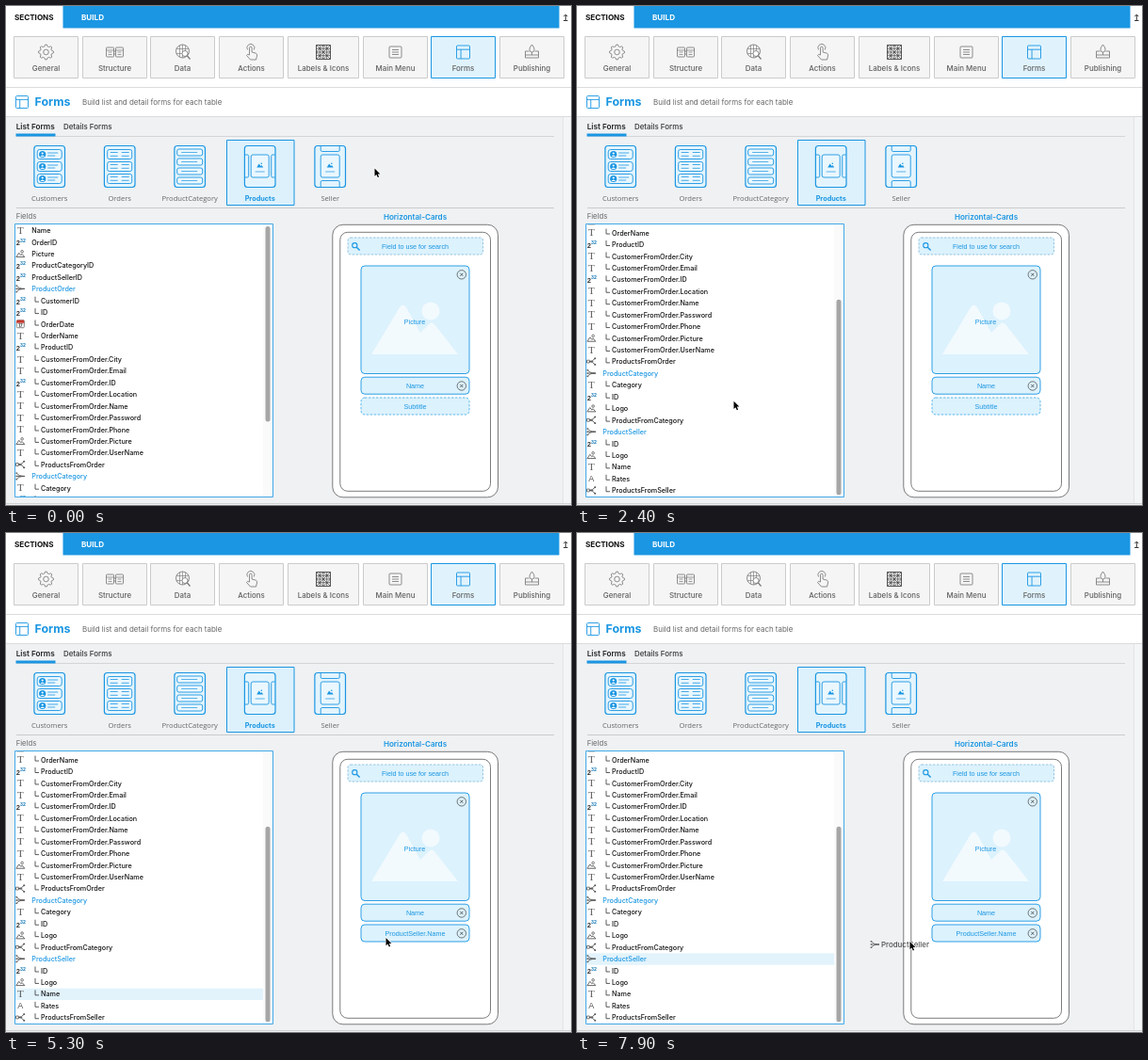
Write an HTML page with a canvas that moves like this. It is 600 px wide and 530 px high and loops after 8000 ms.

```html
<!DOCTYPE html>
<html lang="en">
<head>
<meta charset="utf-8">
<title>Forms editor</title>
<style>
html, body { margin: 0; width: 100%; height: 100%; overflow: hidden; background: #fff; }
canvas { display: block; width: 600px; height: 530px; }
</style>
</head>
<body>
<canvas id="stage"></canvas>
<script>
const W = 600, H = 530, LOOP = 8000, STEP = 100;
const BLUE = '#1a96e2', PALE = '#dcf2fd', GREY = '#737373', LINE = '#c9cbcd';
const SANS = 'Inter, "Open Sans", sans-serif';
const ARIAL = '"Liberation Sans", Arial, sans-serif';
const ROW = 12.44, LIST_TOP = 238.5;

const canvas = document.getElementById('stage');
const c = canvas.getContext('2d');
const dpr = window.devicePixelRatio || 1;
canvas.width = W * dpr;
canvas.height = H * dpr;

const rows = ('T Name,# OrderID,P Picture,# ProductCategoryID,# ProductSellerID,R ProductOrder,' +
  '# CustomerID,# ID,D OrderDate,T OrderName,# ProductID,' +
  'T CustomerFromOrder.City,T CustomerFromOrder.Email,# CustomerFromOrder.ID,' +
  'T CustomerFromOrder.Location,T CustomerFromOrder.Name,T CustomerFromOrder.Password,' +
  'T CustomerFromOrder.Phone,P CustomerFromOrder.Picture,T CustomerFromOrder.UserName,' +
  'M ProductsFromOrder,R ProductCategory,T Category,# ID,P Logo,M ProductFromCategory,' +
  'R ProductSeller,# ID,P Logo,T Name,A Rates,M ProductsFromSeller')
  .split(',').map(s => ({ type: s[0], name: s.slice(2) }));

// Keyframes: time, values...
const cursorKeys = [
  [300, 391.5, 172.5], [900, 169.5, 418], [2300, 169.5, 418], [3300, 62, 478],
  [3400, 62, 478], [3500, 54, 489], [3600, 55, 489], [4100, 403.5, 430],
  [5300, 403.5, 430], [6500, 78, 458], [6700, 78, 458], [6900, 57, 450],
  [7100, 57, 450], [7900, 353.5, 434]
];
const scrollKeys = [[900, 0], [1800, 49.8], [2000, 109.4]];

const ease = u => u * u * (3 - 2 * u);
const same = u => u;

function sample(keys, t, curve) {
  if (t <= keys[0][0]) return keys[0].slice(1);
  for (let i = 1; i < keys.length; i++) {
    const a = keys[i - 1], b = keys[i];
    if (t <= b[0]) {
      const u = curve((t - a[0]) / (b[0] - a[0]));
      return a.slice(1).map((v, k) => v + (b[k + 1] - v) * u);
    }
  }
  return keys[keys.length - 1].slice(1);
}

function text(s, x, y, size, color, o = {}) {
  c.font = `${o.weight || 400} ${size}px ${o.font || SANS}`;
  c.textAlign = o.align || 'left';
  c.fillStyle = color;
  c.fillText(s, x, y + size * 0.36);
}

function rect(x, y, w, h, color) {
  c.fillStyle = color;
  c.fillRect(x, y, w, h);
}

function box(x, y, w, h, r, fill, stroke, lw = 1, dash = []) {
  c.beginPath();
  c.roundRect(x, y, w, h, r);
  if (fill) { c.fillStyle = fill; c.fill(); }
  if (stroke) {
    c.strokeStyle = stroke;
    c.lineWidth = lw;
    c.setLineDash(dash);
    c.stroke();
    c.setLineDash([]);
  }
}

function dot(x, y, r, fill, stroke, lw = 1) {
  c.beginPath();
  c.arc(x, y, r, 0, 7);
  if (fill) { c.fillStyle = fill; c.fill(); }
  if (stroke) { c.strokeStyle = stroke; c.lineWidth = lw; c.stroke(); }
}

// SVG path drawn relative to (x, y)
function path(d, x, y, stroke, lw = 0.8, fill) {
  c.save();
  c.translate(x, y);
  const p = new Path2D(d);
  if (fill) { c.fillStyle = fill; c.fill(p); }
  if (stroke) { c.strokeStyle = stroke; c.lineWidth = lw; c.stroke(p); }
  c.restore();
}

function gear(x, y) {
  c.beginPath();
  for (let i = 0; i < 32; i++) {
    const a = (i - 0.5) * Math.PI / 16, r = i % 4 < 2 ? 8 : 6.2;
    c.lineTo(x + r * Math.cos(a), y + r * Math.sin(a));
  }
  c.closePath();
  c.strokeStyle = GREY;
  c.lineWidth = 0.8;
  c.stroke();
  dot(x, y, 2.8, null, GREY, 0.8);
}

function layoutIcon(x, y, s) {
  box(x - s, y - s, 2 * s, 2 * s, 1, null, BLUE, 0.9);
  path(`M${-s} ${-s * 0.4}H${s}M${-s * 0.35} ${-s * 0.4}V${s}`, x, y, BLUE, 0.9);
}

const toolIcons = [
  gear,
  (x, y) => {
    for (const k of [-9, 1]) {
      box(x + k, y - 5, 8, 10, 0.8, null, GREY, 0.8);
      path('M0 -2H8M2 0H6M2 2.5H6', x + k, y, GREY, 0.7);
    }
    path('M-1 -1H1M-1 2H1', x, y, GREY);
  },
  (x, y) => {
    dot(x, y - 1, 7, null, GREY, 0.8);
    path('M-6.5 -3.5H6.5M-6.5 1.5H6.5M-3 -7V5M0 -8V6M3 -7V5', x, y, GREY, 0.6);
    dot(x + 2.5, y + 1.5, 3, '#fff', GREY, 0.8);
    path('M4.7 3.7L8 7.5', x, y, GREY, 1.2);
  },
  (x, y) => {
    path('M-2 3V-4.5A1.3 1.3 0 0 1 .6 -4.5V0L5 1.2Q6.5 2 6 4L5 8H-1L-5 3.5Q-4.5 1.5 -2 3Z', x, y, GREY);
    path('M-4 -2.5A4 4 0 1 1 2.8 -2.5', x, y, GREY);
  },
  (x, y) => {
    box(x - 7.5, y - 7.5, 15, 15, 0, null, '#444', 0.9);
    path('M-7.5 -3.7H7.5M-7.5 0H7.5M-7.5 3.7H7.5M-3.7 -7.5V7.5M0 -7.5V7.5M3.7 -7.5V7.5' +
      'M-7.5 -7.5L7.5 7.5M7.5 -7.5L-7.5 7.5M0 -7.5L7.5 0L0 7.5L-7.5 0Z', x, y, '#444', 0.7);
  },
  (x, y) => {
    box(x - 6.5, y - 6, 13, 12, 1, null, GREY, 0.8);
    path('M-3.5 -2.5H3.5M-3.5 0H3.5M-3.5 2.5H3.5', x, y, GREY);
  },
  (x, y) => layoutIcon(x, y, 7),
  (x, y) => {
    path('M-3 -1H-7V6H7V-1H3M-7 3H7', x, y, GREY);
    path('M0 -8Q3 -4.5 2.5 -2.5A2.5 2.5 0 0 1 -2.5 -2.5Q-3 -4.5 0 -8ZM0 0V3', x, y, GREY);
  }
];
const tools = ['General', 'Structure', 'Data', 'Actions', 'Labels & Icons', 'Main Menu', 'Forms', 'Publishing'];

function header() {
  rect(0, 0, W, H, '#fff');
  rect(60.5, 0, 527, 23.5, BLUE);
  text('SECTIONS', 9, 12, 8.1, '#111', { weight: 700 });
  text('BUILD', 80, 12, 8.1, '#fff', { weight: 700 });
  path('M0 3V-2.5M-2 -1L0 -3.2L2 -1M-2.2 3.3H2.2', 594.3, 12.2, '#333', 1);

  let x = 9;
  tools.forEach((name, i) => {
    const left = Math.round(x) - 0.5, w = i === 4 ? 75 : 68, on = name === 'Forms';
    box(left, 32.5, w, 44, 0, on ? '#e0f3fd' : '#f5f5f6', on ? BLUE : '#cbcbcb');
    toolIcons[i](left + w / 2, 49);
    text(name, left + w / 2, 65.7, 7.9, '#5f5f5f', { align: 'center', weight: 500 });
    x += w + 4.7;
  });

  rect(0, 86, W, 1, '#dcdcdc');
  layoutIcon(17, 102, 6.5);
  text('Forms', 30.5, 102, 12.4, BLUE, { weight: 700 });
  text('Build list and detail forms for each table', 81, 102, 7.95, '#666');
  rect(0, 117, W, 413, '#eff1f3');
  rect(0, 117, W, 1, '#d9dbdd');
  rect(591, 118, 1, 410, '#e2e4e6');
  rect(592, 118, 8, 410, '#f4f5f6');
  rect(0, 528, W, 1, '#cfd1d3');

  text('List Forms', 10.7, 128.2, 8.2, '#222', { weight: 600 });
  text('Details Forms', 61, 128.2, 7.9, '#333', { weight: 500 });
  rect(11, 138, 571, 1, '#d3d5d7');
  rect(10.5, 135.5, 42, 3, BLUE);
}

function thumbnail(x, y) {
  path('M-3.5 2.5L-1 -1.5L.8 1L1.8 0L3.5 2.5Z', x, y, null, 0, BLUE);
  dot(x + 1.6, y - 1.7, 0.8, BLUE);
}

const CARD = '#eaf7fe';
const cards = {
  Customers(x) {
    for (const y of [157.5, 170.5, 183.5]) {
      box(x - 13, y - 5, 26, 10, 2.5, CARD, BLUE, 0.9);
      dot(x - 7.5, y, 3.6, BLUE);
      dot(x - 7.5, y - 1, 1.1, '#fff');
      path('M-2.3 2.5Q0 -.6 2.3 2.5Z', x - 7.5, y, null, 0, '#fff');
      path('M-2 -1.5H9M-2 1.5H6', x, y, BLUE);
    }
  },
  Orders(x) {
    for (const y of [157.5, 170.5, 183.5]) {
      box(x - 13, y - 5, 26, 10, 2, CARD, BLUE, 0.9);
      path('M-10 -2H-2M2 -2H10M-10 1.8H-2M2 1.8H10', x, y, BLUE);
    }
  },
  ProductCategory(x) {
    for (const y of [155.5, 165.5, 175.5, 185.5]) {
      box(x - 13.5, y - 3.5, 27, 7, 2, CARD, BLUE, 0.9);
      path('M-9 0H8', x, y, BLUE, 0.7);
    }
  },
  Products(x) {
    path('M-16 158H-13.5Q-12 158 -12 159.5V180.5Q-12 182 -13.5 182H-16' +
      'M16 158H13.5Q12 158 12 159.5V180.5Q12 182 13.5 182H16', x, 0, BLUE, 0.9);
    box(x - 9.5, 158, 19, 24, 2, CARD, BLUE, 0.9);
    thumbnail(x, 169);
    path('M-5 176H5', x, 0, BLUE, 0.7);
  },
  Seller(x) {
    path('M-10 148V153Q-10 154.5 -8.5 154.5H8.5Q10 154.5 10 153V148' +
      'M-10 193V187Q-10 185.5 -8.5 185.5H8.5Q10 185.5 10 187V193', x, 0, BLUE, 0.9);
    box(x - 10, 158, 20, 24, 2, CARD, BLUE, 0.9);
    thumbnail(x, 169);
    path('M-5 176H5', x, 0, BLUE, 0.7);
  }
};

function tables() {
  Object.keys(cards).forEach((name, i) => {
    const x = 46.2 + i * 74.5, on = name === 'Products';
    if (on) box(234.5, 142.5, 71.5, 69, 0, '#dcf1fc', BLUE);
    box(x - 16.3, 148.5, 32.6, 44, 3, '#e3f4fd', BLUE, 1.2);
    cards[name](x);
    text(name, x, 204, on ? 7.3 : 7.6, on ? BLUE : '#666',
      { align: 'center', weight: on ? 700 : 400, font: on ? SANS : '"Open Sans", sans-serif' });
  });
  rect(11, 214, 571, 1, LINE);
}

function fieldIcon(type, x, y) {
  const ink = '#555';
  switch (type) {
    case 'T':
      text('T', x, y - 0.5, 11, ink, { align: 'center', font: '"Liberation Serif", serif' });
      break;
    case 'A':
      text('A', x, y, 9, ink, { align: 'center', font: ARIAL });
      break;
    case '#':
      text('2', x - 4.5, y + 1, 7.5, '#333', { weight: 700, font: ARIAL });
      text('32', x - 0.3, y - 2, 5.2, '#1479b8', { weight: 700, font: ARIAL });
      break;
    case 'P':
      path('M-4.5 3.5L-1.5 -.8L.5 1.6L1.8 .4L4.5 3.5Z', x, y, ink, 0.9);
      dot(x + 1.8, y - 2.3, 1.3, null, ink, 0.8);
      break;
    case 'D':
      box(x - 4, y - 4, 8, 8, 1, '#fff', '#666', 0.8);
      rect(x - 4, y - 4, 8, 3, '#c8382e');
      text('17', x, y + 1.5, 4.5, '#333', { align: 'center', weight: 700 });
      break;
    case 'R':
      path('M-4 -3.3Q-2 0 4.5 0M-4 3.3Q-2 0 4.5 0M-4 0H4.5', x, y, ink, 0.9);
      for (const k of [-3.3, 0, 3.3]) rect(x - 4.8, y + k - 0.7, 1.6, 1.4, ink);
      break;
    case 'M':
      path('M-2 0Q1 0 4 -3.3M-2 0Q1 0 4 3.3M-2 0H2', x, y, ink, 0.9);
      box(x - 4.8, y - 1.4, 2.8, 2.8, 0, null, ink, 0.8);
      for (const k of [-3.3, 3.3]) rect(x + 3, y + k - 0.8, 1.8, 1.6, ink);
  }
}

function fieldList(scroll, selected) {
  text('Fields', 10.7, 223.5, 7.7, '#666');
  rect(10, 232, 273.5, 290, '#fff');
  c.save();
  c.beginPath();
  c.rect(10, 232.5, 273, 289);
  c.clip();
  rows.forEach((row, i) => {
    const y = LIST_TOP + i * ROW - scroll;
    if (y < 222 || y > 532) return;
    const link = row.type === 'R', child = i > 5 && !link;
    if (i === selected) rect(10, y - ROW / 2, 263, ROW, '#e2f3fc');
    fieldIcon(row.type, 15.3, y - 0.3);
    if (child) path('M0 -4.5V1H4', 31, y, '#333', 0.8);
    text(row.name, child ? 37 : 27.3, y, 7.2, link ? BLUE : '#111', { weight: 500 });
  });
  rect(273, 232, 10.5, 290, '#fafafa');
  box(275.5, 234 + scroll * 0.71, 5, 207.5, 2.5, '#a6a6a6');
  c.restore();
  box(9.5, 231.5, 274, 290, 0, null, '#42a9e8', 1);
}

function closeMark(x, y) {
  dot(x, y, 4.7, null, '#555', 0.8);
  path('M-1.6 -1.6L1.6 1.6M1.6 -1.6L-1.6 1.6', x, y, '#555', 0.9);
}

function slot(y, label, filled, hover) {
  box(377, y, 115, 18, 4, hover ? '#92d3f8' : PALE, filled ? BLUE : '#4fb0ea', 0.9, filled ? [] : [2.5, 1.5]);
  text(label, 434.5, y + 9.3, 7.2, BLUE, { align: 'center', font: ARIAL });
  if (filled) closeMark(483.8, y + 9.3);
}

function phone(dropped, hover) {
  text('Horizontal-Cards', 434.5, 224, 8.1, BLUE, { align: 'center', weight: 600 });
  box(346.8, 232.3, 175.7, 289.5, 11, '#fff', '#5a5a5a', 0.8);
  box(354.8, 240.3, 159.7, 275, 8, '#fff', '#5a5a5a', 0.8);
  box(363, 246, 143.5, 18, 3, PALE, '#7fb8d8', 0.8, [2.5, 1.5]);
  dot(370.3, 254.2, 2.6, null, BLUE, 1.1);
  path('M0 0L3.3 3.3', 372.3, 256.2, BLUE, 1.4);
  text('Field to use for search', 434.5, 255.5, 7.2, BLUE, { align: 'center', font: ARIAL });

  box(377, 276, 115, 114.5, 4, PALE, BLUE, 0.9);
  path('M0 0L30 -50Q33.5 -55 37 -50L52 -23L61 -32Q64 -35 67 -32L92 0Z', 388, 370, null, 0, '#f2fafe');
  dot(451, 324, 9.5, '#f2fafe');
  text('Picture', 434, 335, 7.2, BLUE, { align: 'center', font: ARIAL });
  closeMark(483.8, 285.3);
  slot(394.2, 'Name', true);
  slot(416, dropped ? 'ProductSeller.Name' : 'Subtitle', dropped, hover);
}

function dragLabel(type, label, x, y) {
  c.globalAlpha = 0.85;
  fieldIcon(type, x - 38.5, y);
  text(label, x - 32, y, 7.9, '#333', { weight: 500 });
  c.globalAlpha = 1;
}

function pointer(x, y) {
  const arrow = 'M0 0V8.2L1.9 6.5L3.3 9.6L4.6 9L3.3 5.9H5.9Z';
  path(arrow, x, y, '#fff', 1.3);
  path(arrow, x, y, null, 0, '#000');
}

function draw(t) {
  const [x, y] = sample(cursorKeys, t, ease);
  const [scroll] = sample(scrollKeys, t, same);
  const dragName = t >= 3600 && t < 4500;
  const dragSeller = t >= 7100;
  const dropped = t >= 4500;
  const hover = dragName && x > 377 && x < 492 && y > 416 && y < 434;
  const selected = t >= 7000 ? 26 : t >= 3500 ? 29 : -1;

  c.setTransform(dpr, 0, 0, dpr, 0, 0);
  header();
  tables();
  fieldList(scroll, selected);
  phone(dropped, hover);
  if (dragName) dragLabel('T', 'ProductSeller.Name', x - 0.5, y + 0.5);
  if (dragSeller) dragLabel('R', 'ProductSeller', x + 1.5, y + 3);
  pointer(x, y);
  if (hover) {
    dot(x + 5.2, y + 12, 5.5, '#2fae3a', '#fff', 0.8);
    path('M-3 0H3M0 -3V3', x + 5.2, y + 12, '#fff', 1.6);
  }
}

const start = performance.now();
function tick() {
  const t = (performance.now() - start) % LOOP;
  draw(Math.floor(t / STEP) * STEP);
  requestAnimationFrame(tick);
}
tick();
</script>
</body>
</html>
```
